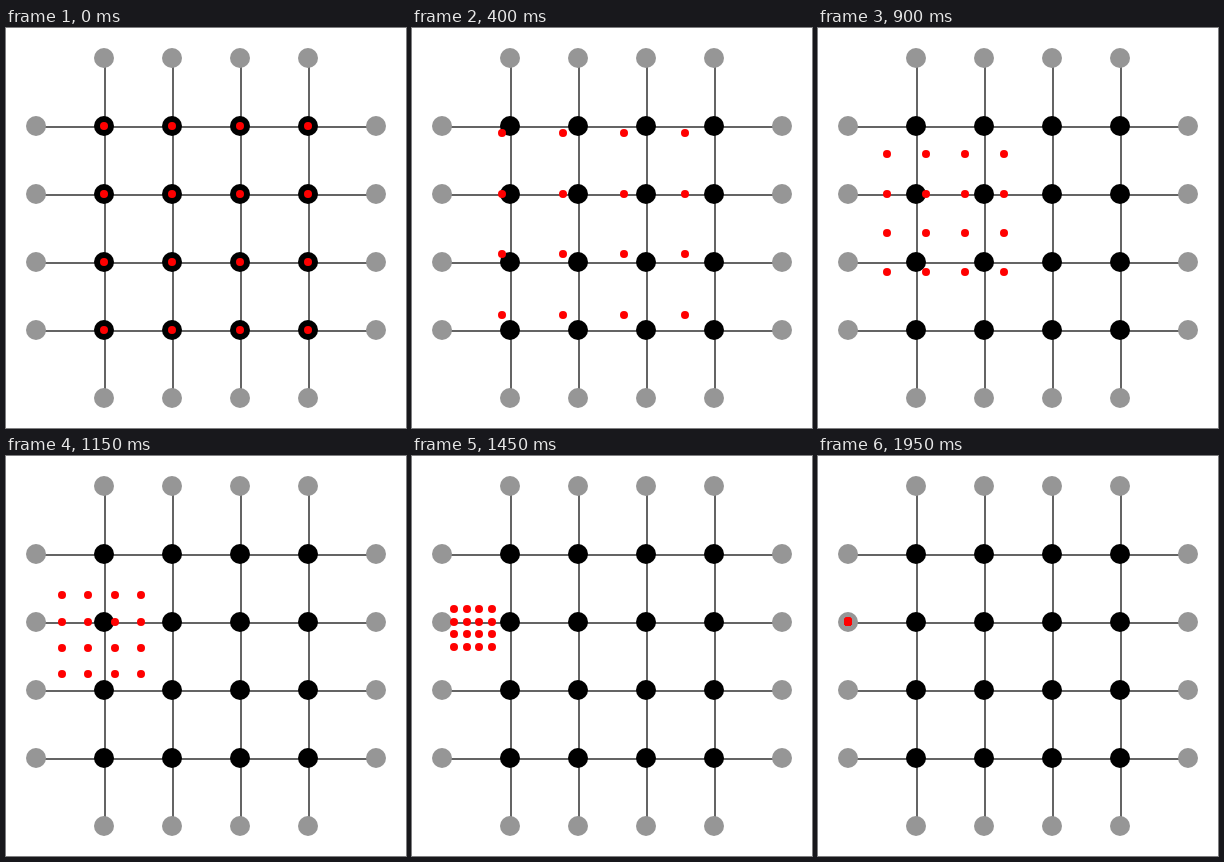
Recreate the animation shown at these times as an HTML page with a canvas. Size 400 by 400 pixels, loop 2000 ms.

```html
<!DOCTYPE html>
<html>
<head>
<meta charset="utf-8">
<style>
html, body { margin: 0; width: 100%; height: 100%; overflow: hidden; background: #fff; }
canvas { display: block; }
</style>
</head>
<body>
<canvas id="stage" width="400" height="400"></canvas>
<script>
const ctx = document.getElementById('stage').getContext('2d');
const LOOP = 2000, STEP = 50;
const FIRST = 30, LAST = 370;
const inner = [98, 166, 234, 302];
const goal = { x: 30, y: 166 };

function disc(x, y, r, color) {
  ctx.fillStyle = color;
  ctx.beginPath();
  ctx.arc(x, y, r, 0, Math.PI * 2);
  ctx.fill();
}

function drawGrid() {
  ctx.strokeStyle = '#646464';
  ctx.lineWidth = 2;
  ctx.beginPath();
  for (const p of inner) {
    ctx.moveTo(FIRST, p + 1);
    ctx.lineTo(LAST, p + 1);
    ctx.moveTo(p + 1, FIRST);
    ctx.lineTo(p + 1, LAST);
  }
  ctx.stroke();
  for (const p of inner) {
    for (const end of [FIRST, LAST]) {
      disc(end, p, 10, '#969696');
      disc(p, end, 10, '#969696');
    }
    for (const q of inner) disc(p, q, 10, '#000');
  }
}

const smooth = t => t * t * (3 - 2 * t);
const glide = (from, to, k) => Math.floor(from + (to - from) * k);

function draw(ms) {
  const k = smooth(Math.floor(ms / STEP) * STEP / LOOP);
  ctx.fillStyle = '#fff';
  ctx.fillRect(0, 0, 400, 400);
  drawGrid();
  for (const x of inner) {
    for (const y of inner) {
      disc(glide(x, goal.x, k), glide(y, goal.y, k), 4, '#f00');
    }
  }
}

const start = performance.now();
function tick() {
  draw((performance.now() - start) % LOOP);
  requestAnimationFrame(tick);
}
draw(0);
requestAnimationFrame(tick);
</script>
</body>
</html>
```
